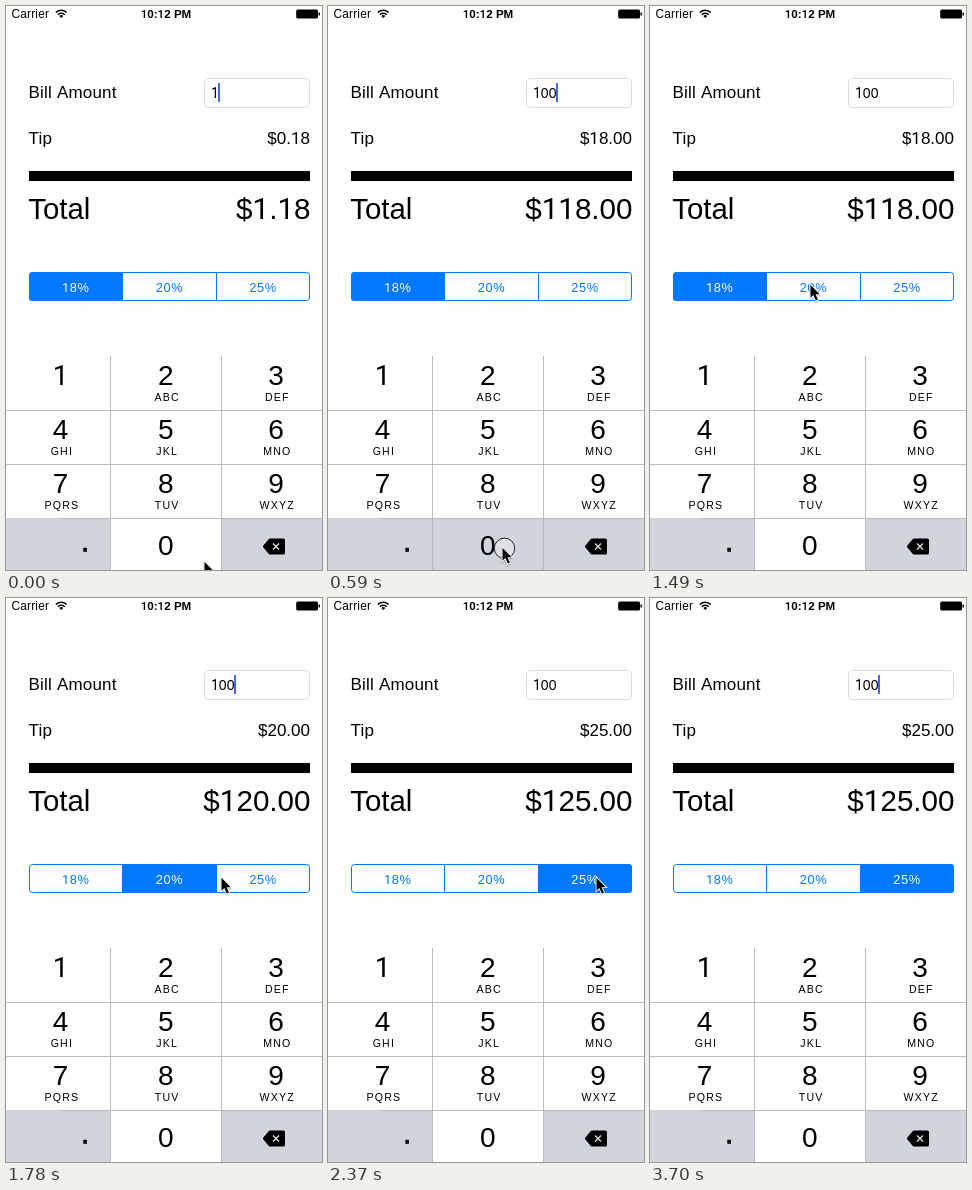
These frames come from a looping animation (316 px wide and 564 px high, 4 s). An HTML page with a canvas:

```html
<!DOCTYPE html>
<html lang="en">
<head>
<meta charset="utf-8">
<title>Tip calculator</title>
<style>
html, body { margin: 0; width: 100%; height: 100%; overflow: hidden; background: #fefefe; }
canvas { display: block; width: 316px; height: 564px; }
</style>
</head>
<body>
<canvas id="stage"></canvas>
<script>
const W = 316, H = 564, LOOP = 4000;
const BLUE = '#0079ff', PAPER = '#fefefe', GRAY = '#d1d4db', LINE = '#babbbe';
const SANS = '"Liberation Sans", Arial, sans-serif';
const ONES = 'Roboto, sans-serif';   // plain numeral one, without a foot
const RATES = [18, 20, 25];

const canvas = document.getElementById('stage');
const ctx = canvas.getContext('2d');
const dpr = window.devicePixelRatio || 1;
canvas.width = W * dpr;
canvas.height = H * dpr;

const clamp = (v, lo, hi) => Math.min(hi, Math.max(lo, v));

const tickAt = ms => Math.floor((ms + 8) / 148);
const billAt = n => 10 ** clamp(n - 2, 0, 2);
const choiceAt = n => (n >= 11) + (n >= 15);
const glowAt = (n, i) => ((choiceAt(n) === i) + (choiceAt(n - 1) === i)) / 2;
const touchAt = n => n === 2 || n === 4;
const pressedAt = n => n === 4;

function caretAt(n) {
  if (n >= 3 && n < 8) return 1;   // solid while typing
  return clamp(0.5 - Math.sin((n - 7.93) / 6.6 * 2 * Math.PI), 0, 1);
}

// Pointer key points: tick, x, y
const PATH = [
  [0, 198, 556], [2, 174, 542], [4, 174, 542], [5, 175, 531], [6, 148, 346],
  [7, 146, 242], [8, 153, 276], [10, 160, 279], [11, 160, 279], [13, 269, 281],
  [18, 268, 280], [19, 256, 283], [20, 235, 338], [21, 200, 493], [22, 220, 531]
];

function pointerAt(n) {
  const next = PATH.findIndex(p => p[0] >= n);
  if (next < 0) return null;
  const [n1, x1, y1] = PATH[next];
  const [n0, x0, y0] = PATH[Math.max(0, next - 1)];
  const k = n1 > n0 ? (n - n0) / (n1 - n0) : 1;
  return [x0 + (x1 - x0) * k, y0 + (y1 - y0) * k].map(Math.round);
}

function rect(x, y, w, h, color) {
  ctx.fillStyle = color;
  ctx.fillRect(x, y, w, h);
}

function box(x, y, w, h, r) {
  ctx.beginPath();
  ctx.roundRect(x, y, w, h, r);
}

function trace(points) {
  ctx.beginPath();
  points.forEach(([x, y], i) => i ? ctx.lineTo(x, y) : ctx.moveTo(x, y));
}

function text(str, x, y, size, opt = {}) {
  const { align = 0, color = '#000', weight = 400, spacing = 0 } = opt;
  ctx.letterSpacing = spacing + 'px';
  ctx.fillStyle = color;
  const runs = str.split(/(1+)/).filter(Boolean).map(s => {
    const one = s[0] === '1';
    const font = `${one && weight > 400 ? 500 : weight} ${size}px ${one ? ONES : SANS}`;
    ctx.font = font;
    return { s, font, w: ctx.measureText(s).width };
  });
  const total = runs.reduce((sum, r) => sum + r.w, 0) - spacing;
  x -= total * align;
  for (const r of runs) {
    ctx.font = r.font;
    ctx.fillText(r.s, x, y);
    x += r.w;
  }
  ctx.letterSpacing = '0px';
}

function statusBar() {
  text('Carrier', 5.5, 12.3, 11.85, { spacing: 0.2 });
  text('10:12 PM', 160, 12.3, 11.6, { align: 0.5, weight: 700 });

  ctx.strokeStyle = ctx.fillStyle = '#000';
  ctx.lineWidth = 1.6;
  const wave = r => ctx.arc(55.3, 12, r, -Math.PI * 0.75, -Math.PI * 0.25);
  for (const r of [4.8, 7.7]) {
    ctx.beginPath();
    wave(r);
    ctx.stroke();
  }
  ctx.beginPath();
  ctx.moveTo(55.3, 12);
  wave(2.8);
  ctx.fill();

  box(290.2, 3.5, 21.8, 9, 1.5);
  ctx.fill();
  box(312.5, 6.3, 1.4, 3.4, 0.7);
  ctx.fill();
}

function form(n) {
  const bill = billAt(n);
  const tip = bill * RATES[choiceAt(n)] / 100;
  text('Bill Amount', 22.5, 91.6, 17, { spacing: 0.2 });
  text('Tip', 22.5, 137.6, 17, { spacing: 0.2 });
  text('$' + tip.toFixed(2), 304, 137.6, 17, { align: 1 });
  rect(23, 165, 281, 10, '#000');
  text('Total', 22.3, 213, 29.4);
  text('$' + (bill + tip).toFixed(2), 304.5, 213, 29.6, { align: 1 });

  ctx.strokeStyle = '#dcdcdc';
  ctx.lineWidth = 1;
  box(198.5, 72.5, 105, 29, 4);
  ctx.stroke();
  const digits = String(bill);
  text(digits, 205, 91.5, 14);
  ctx.globalAlpha = caretAt(n);
  rect(204 + 8 * digits.length, 77, 2, 19, '#426bf2');
  ctx.globalAlpha = 1;
}

function segments(n) {
  const step = 93.6;
  const edge = i => Math.round(23 + step * i - 0.3);
  ctx.save();
  box(23, 266, 281, 29, 3.5);
  ctx.clip();
  RATES.forEach((_, i) => {
    ctx.globalAlpha = glowAt(n, i);
    rect(edge(i), 266, edge(i + 1) - edge(i) + 1, 29, BLUE);
  });
  ctx.restore();

  ctx.strokeStyle = BLUE;
  ctx.lineWidth = 1;
  box(23.5, 266.5, 280, 28, 3);
  ctx.stroke();
  for (const i of [1, 2]) rect(edge(i), 266, 1, 29, BLUE);

  RATES.forEach((rate, i) => {
    const on = glowAt(n, i);
    for (const [color, alpha] of [[BLUE, 1 - on], ['#fff', on]]) {
      ctx.globalAlpha = alpha;
      text(rate + '%', 69.5 + step * i, 285.5, 12.85, { align: 0.5, color, spacing: 0.6 });
    }
    ctx.globalAlpha = 1;
  });
}

function deleteIcon() {
  ctx.fillStyle = ctx.strokeStyle = '#000';
  ctx.lineJoin = 'round';
  ctx.lineWidth = 3;
  trace([[258.5, 540.5], [264, 534], [277.5, 534], [277.5, 547], [264, 547]]);
  ctx.closePath();
  ctx.fill();
  ctx.stroke();
  ctx.strokeStyle = '#e4e6ea';
  ctx.lineWidth = 1.3;
  for (const d of [-3, 3]) {
    trace([[270 - d, 537.5], [270 + d, 543.5]]);
    ctx.stroke();
  }
}

function keypad(n) {
  rect(0, 513, 104, 51, GRAY);
  rect(216, 513, 100, 51, GRAY);
  if (pressedAt(n)) rect(105, 513, 110, 51, GRAY);

  for (const x of [104, 215]) rect(x, 350, 1, 214, LINE);
  for (const y of [404, 458, 512]) rect(0, y, W, 1, LINE);
  rect(0, 512, 52, 1, GRAY);

  const names = ' ABC DEF GHI JKL MNO PQRS TUV WXYZ'.split(' ');
  const centers = [54.6, 159.8, 270];
  names.forEach((name, i) => {
    const x = centers[i % 3], y = 379.3 + 54 * Math.floor(i / 3);
    text(String(i + 1), x, y, 28, { align: 0.5 });
    text(name, x + 0.7, y + 15.5, 10.6, { align: 0.5, spacing: 1.2 });
  });
  text('0', centers[1], 549, 28, { align: 0.5 });
  rect(77.3, 541.8, 3.6, 4, '#000');
  deleteIcon();
}

function pointer(n) {
  if (touchAt(n)) {
    ctx.beginPath();
    ctx.arc(176.5, 542.3, 10.2, 0, Math.PI * 2);
    ctx.fillStyle = 'rgba(255,255,255,0.3)';
    ctx.fill();
    ctx.strokeStyle = '#222';
    ctx.lineWidth = 1;
    ctx.stroke();
  }
  const tip = pointerAt(n);
  if (!tip) return;
  ctx.save();
  ctx.translate(tip[0] + 0.5, tip[1] - 0.3);
  trace([[0, 0], [0, 13], [2.9, 10.3], [5.3, 15.9], [7.4, 15], [5.1, 9.5], [9.2, 9.5]]);
  ctx.closePath();
  ctx.lineJoin = 'miter';
  ctx.lineWidth = 1.8;
  ctx.strokeStyle = '#fff';
  ctx.shadowColor = 'rgba(0,0,0,0.3)';
  ctx.shadowBlur = 2 * dpr;
  ctx.shadowOffsetY = dpr;
  ctx.stroke();
  ctx.shadowColor = 'transparent';
  ctx.fillStyle = '#000';
  ctx.fill();
  ctx.restore();
}

function draw() {
  const n = tickAt(performance.now() % LOOP);
  ctx.setTransform(dpr, 0, 0, dpr, 0, 0);
  rect(0, 0, W, H, PAPER);
  statusBar();
  form(n);
  segments(n);
  keypad(n);
  pointer(n);
  requestAnimationFrame(draw);
}
draw();
</script>
</body>
</html>
```
